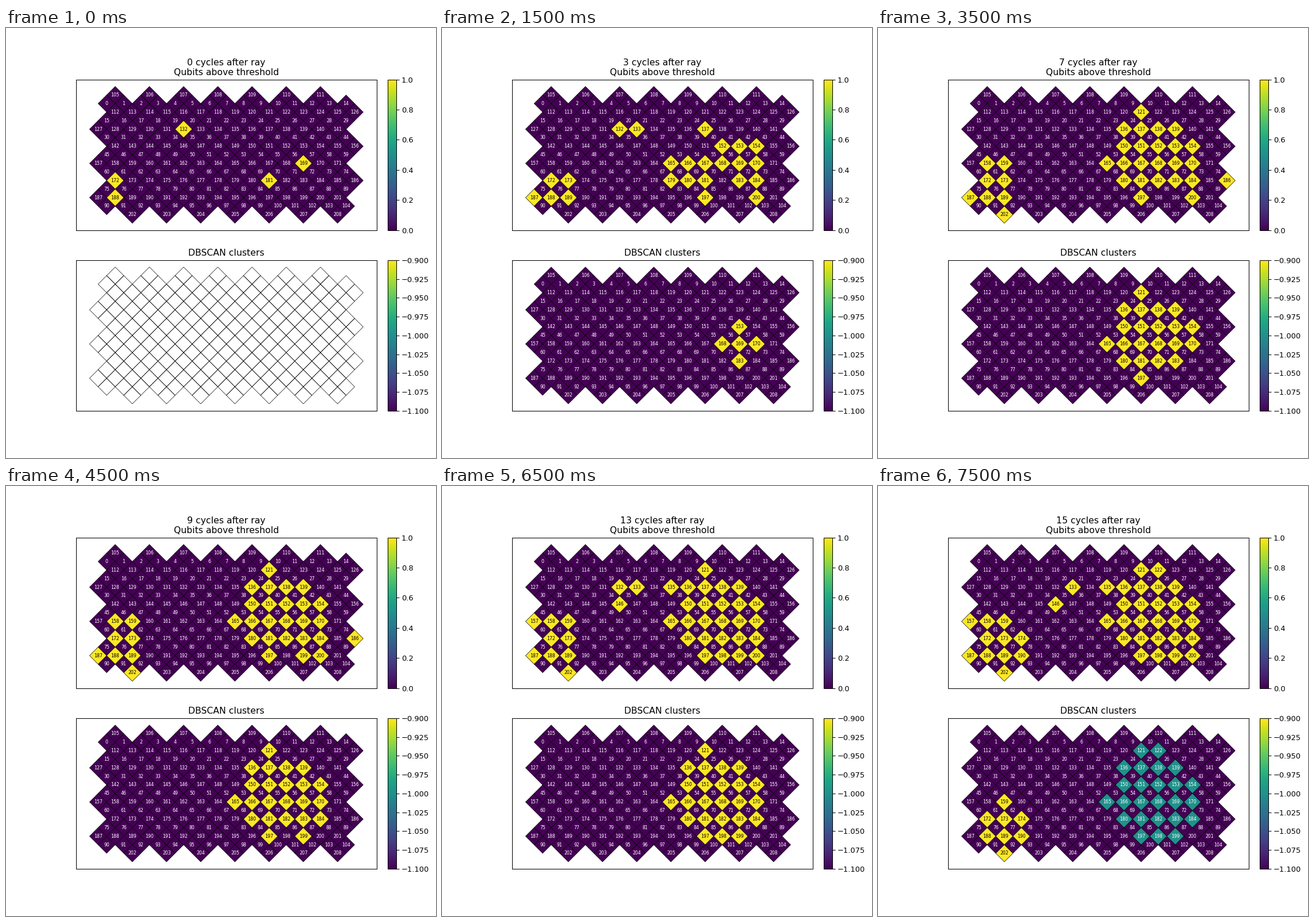
These frames come from a looping animation (748 px wide and 748 px high, 8 s). A matplotlib script:

```python
import numpy as np
import matplotlib.pyplot as plt
from matplotlib.animation import FuncAnimation
from matplotlib.cm import ScalarMappable
from matplotlib.collections import PolyCollection
from matplotlib.colors import Normalize

CYCLES = 16
VIRIDIS = plt.get_cmap("viridis")

# Qubits that flip between above and below threshold at each cycle
FLIPS = [
    [132, 169, 172, 181, 188],
    [152],
    [133, 154, 159, 166, 167, 170, 173, 180, 183, 184, 187, 189, 197, 200],
    [137, 153, 159, 165, 168, 179],
    [132, 133, 151, 158, 159, 179, 182, 186, 202],
    [138, 150],
    [121, 136, 154],
    [139, 154],
    [121, 199],
    [121],
    [172, 186, 198],
    [121, 132],
    [133, 135, 172],
    [121, 146, 157],
    [122, 174, 190],
    [132],
]


def lattice():
    """Centres of the 105 data qubits, then the 104 measure qubits."""
    pts = [(c - 7, r - 3) for r in range(7) for c in range(15)]
    pts += [(2 * k - 6.5, -3.5) for k in range(7)]
    for r in range(6):
        x0 = -6.5 if r % 2 == 0 else -7.5
        pts += [(x0 + c, r - 2.5) for c in range(15)]
    pts += [(2 * k - 5.5, 3.5) for k in range(7)]
    return pts


POINTS = lattice()
INDEX = {p: i for i, p in enumerate(POINTS)}


def active(cycle):
    on = set()
    for flips in FLIPS[:cycle + 1]:
        on ^= set(flips)
    return on


def neighbours(q, on):
    x, y = POINTS[q]
    near = ((x + 1, y), (x - 1, y), (x, y + 1), (x, y - 1))
    return [INDEX[p] for p in near if INDEX.get(p) in on]


def dbscan(on, min_samples=5):
    """Label each qubit with its cluster, -1 for noise."""
    labels = np.full(len(POINTS), -1)
    near = {q: neighbours(q, on) for q in on}
    core = {q for q in on if len(near[q]) + 1 >= min_samples}
    cluster = 0
    for seed in sorted(core):
        if labels[seed] >= 0:
            continue
        stack = [seed]
        while stack:
            q = stack.pop()
            if labels[q] >= 0:
                continue
            labels[q] = cluster
            if q in core:
                stack += near[q]
        cluster += 1
    return labels


class Panel:
    def __init__(self, fig, ax, vmin, vmax, ticks):
        self.ax = ax
        ax.set(xlim=(-8.8, 8.8), ylim=(4.4, -4.4), xticks=[], yticks=[])
        ax.set_aspect("equal")
        ax.apply_aspect()
        box = ax.get_position()
        cax = fig.add_axes([box.x1 + 0.025, box.y0, 0.02, box.height])
        fig.colorbar(ScalarMappable(Normalize(vmin, vmax), VIRIDIS),
                     cax=cax, ticks=ticks)
        diamonds = [[(x - .5, y), (x, y - .5), (x + .5, y), (x, y + .5)]
                    for x, y in POINTS]
        self.cells = PolyCollection(diamonds, edgecolors="black",
                                    linewidths=0.5)
        ax.add_collection(self.cells, autolim=False)
        self.labels = [ax.text(x, y, str(i), size=6, ha="center", va="center")
                       for i, (x, y) in enumerate(POINTS)]

    def show(self, values):
        """Colour the cells by value; a constant field is left blank."""
        low, high = values.min(), values.max()
        blank = low == high
        if blank:
            self.cells.set_facecolor("none")
        else:
            level = (values - low) / (high - low)
            self.cells.set_facecolor(VIRIDIS(level))
        for i, label in enumerate(self.labels):
            label.set_visible(not blank)
            if not blank:
                label.set_color("black" if level[i] > 0.7 else "white")


fig, axes = plt.subplots(2, 1, figsize=(8, 8), dpi=93.5)
fig.subplots_adjust(left=0.125, right=0.9, bottom=0.11, top=0.88, hspace=0.2)
above = Panel(fig, axes[0], 0, 1, np.linspace(0, 1, 6))
clusters = Panel(fig, axes[1], -1.1, -0.9, np.linspace(-1.1, -0.9, 9))
clusters.ax.set_title("DBSCAN clusters")


def draw(cycle):
    on = active(cycle)
    above.ax.set_title(f"{cycle} cycles after ray\nQubits above threshold")
    above.show(np.array([float(i in on) for i in range(len(POINTS))]))
    clusters.show(dbscan(on))
    return []


anim = FuncAnimation(fig, draw, frames=CYCLES, interval=500,
                     init_func=lambda: draw(0), repeat=True, repeat_delay=0)
plt.show()
```
